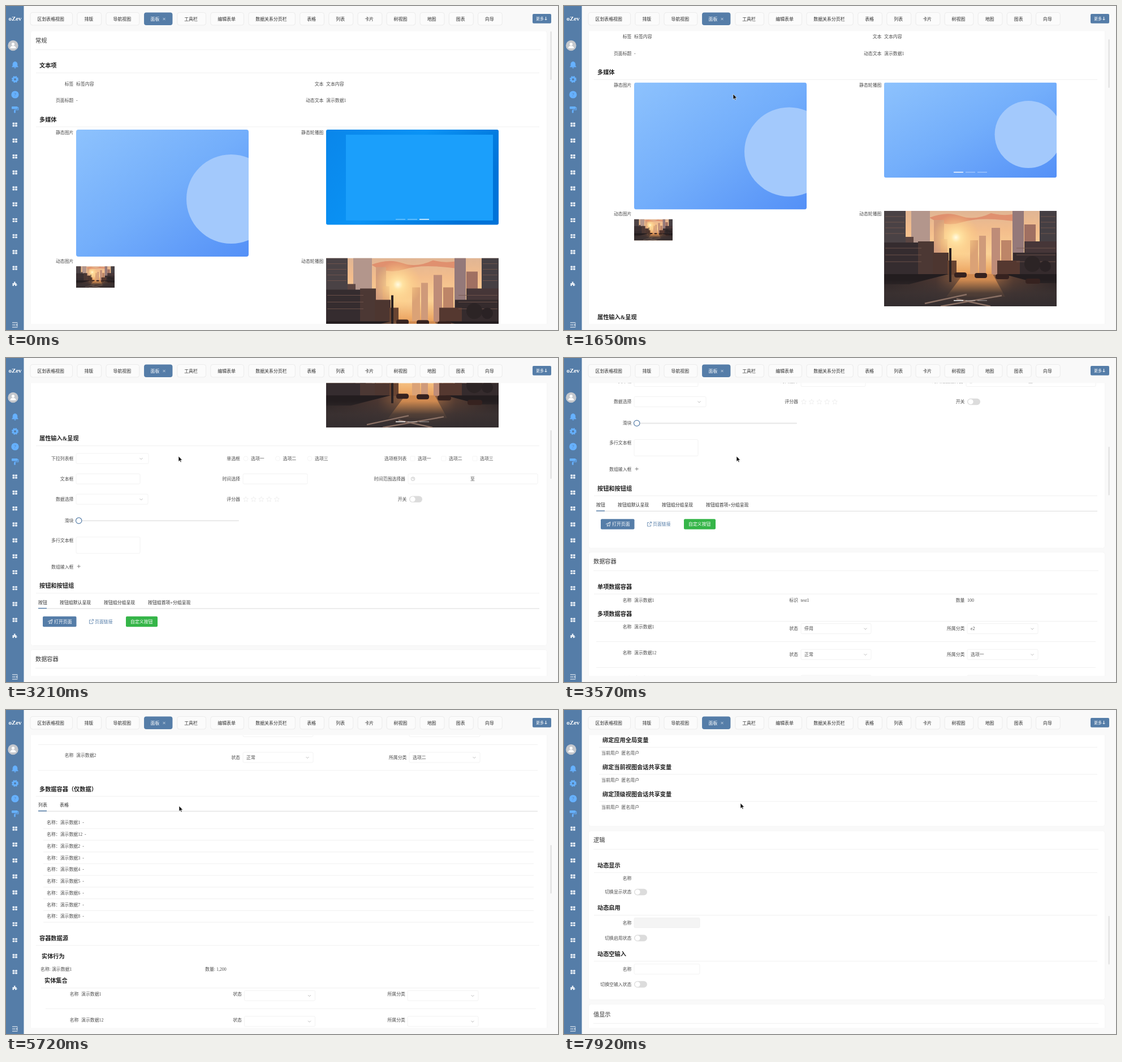
An HTML page that plays this animation: 976 px wide and 574 px high, repeating every 8 s.

```html
<!DOCTYPE html>
<html lang="zh-CN">
<head>
<meta charset="utf-8">
<title>面板</title>
<style>
html, body { margin: 0; width: 100%; height: 100%; overflow: hidden; background: #f9f9f9; }
svg { display: block; width: 976px; height: 574px; }
text { font-family: 'Liberation Serif', 'Noto Sans CJK SC', 'Noto Sans CJK', serif; white-space: pre; }
</style>
</head>
<body>
<svg id="stage" viewBox="0 0 976 574"></svg>
<script>
const BLUE = '#557da8', ICON = '#66b1ff', PALE = '#e6edf5';
const LOOP = 8000;

// ---- drawing helpers: y is the vertical centre of text and controls ----
const rect = (x, y, w, h, fill, r = 0, extra = '') =>
  `<rect x="${x}" y="${y}" width="${w}" height="${h}" rx="${r}" fill="${fill}" ${extra}/>`;
const circle = (x, y, r, fill, extra = '') => `<circle cx="${x}" cy="${y}" r="${r}" fill="${fill}" ${extra}/>`;
const path = (d, stroke, width = 1, fill = 'none') =>
  `<path d="${d}" stroke="${stroke}" stroke-width="${width}" fill="${fill}"/>`;
const shape = (d, fill) => path(d, 'none', 0, fill);
const text = (x, y, str, { size = 7.9, fill = '#4c4c4c', anchor = 'start', bold = false } = {}) =>
  `<text x="${x}" y="${y}" dy=".37em" font-size="${size}" fill="${fill}" text-anchor="${anchor}" font-weight="${bold ? 700 : 400}">${str}</text>`;
const label = (right, y, str) => text(right, y, str, { anchor: 'end' });
const field = (right, y, name, value, gap = 4.5) => label(right, y, name) + text(right + gap, y, value);
const rule = (y, x1 = 52, x2 = 945) => path(`M${x1} ${y}H${x2}`, '#ededed', .8);
const title = (y, str) => text(52, y, str, { size: 10.2, fill: '#333' }) + rule(y + 16.3);
const heading = (y, str, x) => text(x, y, str, { size: 10.2, fill: '#222', bold: true });
const section = (y, str, x = 59) => heading(y, str, x) + rule(y + 13, x - 6, 943);
const input = (x, y, w, h = 18, fill = '#fff') => rect(x, y - h / 2, w, h, fill, 2, 'stroke="#efefef" stroke-width=".8"');
const select = (x, y, w, value = '', arrow = w - 10) =>
  input(x, y, w) + text(x + 6, y, value) + path(`M${x + arrow - 2.5} ${y - 1}l2.5 2.5 2.5-2.5`, '#aaa', .8);
const toggle = (x, y) => rect(x, y - 5.7, 23, 11.4, '#dcdcdc', 5.7) + circle(x + 6, y, 4.6, '#fff');
const tabs = (y, items, x2) => items.map(([x, s]) => text(x, y, s, { fill: '#2c2c2c' })).join('') +
  path(`M57 ${y + 10.8}H${x2}`, '#e2e2e2', 1.2) + path(`M57 ${y + 10.3}h15`, BLUE, 1.4);
const dots = (y, id) => [0, 1, 2].map(i =>
  rect(689 + 21 * i, y, 17, 1.4, '#fff', 0, `${id ? `id="${id}${i}"` : ''} opacity="${i ? .4 : 1}"`)).join('');

const defs = `<defs>
  <linearGradient id="blue" x2="1" y2="1"><stop stop-color="#8dc2fd"/><stop offset=".5" stop-color="#73aefb"/><stop offset="1" stop-color="#5490f7"/></linearGradient>
  <linearGradient id="azure" x2="1" y2=".4"><stop stop-color="#0a86ea"/><stop offset=".5" stop-color="#0a93f5"/><stop offset="1" stop-color="#0073d8"/></linearGradient>
  <linearGradient id="sky" x2="0" y2="1"><stop stop-color="#e0b594"/><stop offset=".2" stop-color="#f3bd8c"/><stop offset=".45" stop-color="#fbd296"/><stop offset=".7" stop-color="#e89a55"/></linearGradient>
  <linearGradient id="road"><stop stop-color="#2d2526"/><stop offset=".3" stop-color="#4a3631"/><stop offset=".55" stop-color="#b67848"/><stop offset=".75" stop-color="#553c32"/><stop offset="1" stop-color="#2e2526"/></linearGradient>
  <linearGradient id="shade" x2="0" y2="1"><stop stop-color="#3b3232" stop-opacity="0"/><stop offset=".5" stop-color="#3b3232" stop-opacity=".85"/><stop offset="1" stop-color="#332d2f"/></linearGradient>
  <radialGradient id="sun"><stop stop-color="#fffbe2"/><stop offset=".2" stop-color="#ffe3a2"/><stop offset="1" stop-color="#ffc878" stop-opacity="0"/></radialGradient>
  <clipPath id="view"><rect x="43" y="44.5" width="914" height="518.5"/></clipPath>
  <clipPath id="still"><rect x="124" y="219" width="305" height="225" rx="4"/></clipPath>
  <clipPath id="slides"><rect x="566" y="219" width="305" height="168.5" rx="3"/></clipPath>
  <symbol id="city" viewBox="0 0 305 169">${city()}</symbol></defs>`;

function city() {
  const far = [[48, 0, 33, '#b3968c'], [88, 16, 18, '#d29c7c'], [100, 50, 12, '#dba075'], [152, 52, 14, '#dba276'],
    [168, 44, 12, '#cf9a7a'], [190, 30, 15, '#be8c78'], [207, 52, 18, '#bd8568'], [227, 0, 20, '#94797a'], [248, 24, 20, '#a07062']];
  const near = [[0, 0, 38, '#4a4245'], [38, 46, 14, '#5c4642'], [0, 56, 70, '#352c2f'], [60, 54, 28, '#4c3834'], [86, 74, 28, '#4d3630'],
    [112, 88, 16, '#684431'], [275, 0, 30, '#453f43'], [248, 54, 57, '#463638'], [228, 74, 77, '#352b2d'], [200, 88, 40, '#553830']];
  const block = ([x, y, w, c]) => rect(x, y, w, 116 - y, c);
  const floors = [10, 20, 30, 40, 66, 78, 90].map(y =>
    path(`M2 ${y}H${y < 50 ? 36 : 66}M${y < 50 ? 277 : 234} ${y}H303`, '#76594f', .8)).join('');
  const cars = [[124, 109, 22], [160, 110, 22], [197, 112, 24], [250, 120, 26]].map(([x, y, w]) => rect(x, y, w, 9, '#36221f', 4)).join('');
  return rect(0, 0, 305, 169, 'url(#sky)') +
    shape('M80 12q30-12 55-3t54-5q20 5 39 2v12q-60-8-90 2t-58-8z', '#e0906f') +
    far.map(block).join('') + circle(127, 47, 42, 'url(#sun)') + near.map(block).join('') + floors +
    rect(0, 113, 305, 56, 'url(#road)') + shape('M140 112h52l22 40H110z', '#d08a50') +
    shape('M0 112h114l-70 18H0zM305 112h-94l60 16h34z', '#231d1f') +
    rect(0, 122, 305, 47, 'url(#shade)') +
    path('M72 164L146 148M100 169L208 150M128 156L188 169', '#8a7064', 2.5) + cars +
    rect(115, 66, 4, 60, '#2a2122') + circle(262, 94, 14, '#2c2425') + circle(285, 98, 10, '#2a2224');
}

function chrome() {
  const grid = y => [0, 1, 2, 3].map(i => rect(11.5 + 4.6 * (i % 2), y - 3.6 + 4 * (i >> 1), 3.8, 3.2, PALE, .8)).join('');
  const sidebar = rect(0, 0, 31.5, 574, BLUE) +
    text(16, 22, 'oZev', { size: 11, fill: '#fff', anchor: 'middle', bold: true }) +
    circle(12.5, 70, 9.2, '#c5c8cd') + circle(12.5, 67.5, 2.6, '#fff') + shape('M7.5 75q0-4.5 5-4.5t5 4.5z', '#fff') +
    path('M10.5 108h11l-1.5-2v-3.5q-.5-3.5-4-4-3.5.5-4 4v3.5zM14.5 109h3l-1.5 1.5z', ICON, .6, ICON) +
    circle(16, 130, 4.8, ICON, `stroke="${ICON}" stroke-width="2.4" stroke-dasharray="2.3 1.47"`) + circle(16, 130, 2, BLUE) +
    circle(16, 157, 6.6, ICON) + text(16, 157, '?', { fill: BLUE, anchor: 'middle', size: 8 }) +
    rect(10, 178, 10.5, 4.5, ICON, 1) + path('M20 180h1.8v4h-6.3v1', ICON, 1.1) + rect(14.2, 184.5, 2.6, 5, ICON, .8) +
    Array.from({ length: 10 }, (_, i) => grid(210.2 + 28.22 * i)).join('') +
    shape('M11.5 496v-5h2.5v-2.5h2.5v2.5h2v2.5h1.5v1h-1.5v1.5h-2.5v-2h-2v2z', PALE) +
    path('M11 561h9.5M11 565h6M11 569h9.5M20.5 563l-2 2 2 2', '#fff', 1.1);

  let x = 43;
  const names = '区划表格视图 排版 导航视图 面板 工具栏 编辑表单 数据关系分页栏 表格 列表 卡片 树视图 地图 图表 向导'.split(' ');
  const nav = names.map(name => {
    const active = name === '面板', width = name.length * 7.93 + (active ? 34.5 : 27);
    const box = rect(x, 11.5, width, 22.5, active ? BLUE : '#fbfbfb', 4, active ? '' : 'stroke="#e8e8e8" stroke-width=".8"') +
      text(x + (active ? 11.5 : 12.5), 22.8, name, { fill: active ? '#fff' : '#2c2c2c' }) +
      (active ? path(`M${x + 33.5} 21l4 4m0-4l-4 4`, '#dbe5ef', .8) : '');
    x += width + 8.3;
    return box;
  }).join('');
  const more = rect(931, 14, 33, 16.8, BLUE, 2) + text(937, 22, '更多', { size: 7, fill: '#fff' }) +
    path('M954.5 19v6m-2-2l2 2 2-2', '#fff', .9);
  return sidebar + nav + more;
}

function general() {
  const outline = 'stroke="#efefef" stroke-width=".7"';
  const options = (x, step, mark) => ['选项一', '选项二', '选项三'].map((s, i) =>
    mark(x + i * step) + text(x + i * step + 9, 670.5, s)).join('');
  const radio = x => circle(x, 670.5, 4, '#fff', outline);
  const check = x => rect(x - 4, 666.5, 8, 8, '#fff', 1, outline);
  const star = x => path(`M${x} 738l1.3 3 3.2.3-2.4 2.2.7 3.2-2.8-1.6-2.8 1.6.7-3.2-2.4-2.2 3.2-.3z`, '#e9e9e9', .7);
  const emblem = (x, y, r) => circle(x, y, r, '#a3c9fc');
  const media = `<g clip-path="url(#still)">${rect(124, 219, 305, 225, 'url(#blue)')}${emblem(398, 342, 79)}</g>
    <g clip-path="url(#slides)">
      <g id="slideOut">${rect(566, 219, 305, 169, 'url(#azure)')}${rect(601, 228, 260, 152, '#1b9ffb')}</g>
      <g id="slideIn">${rect(566, 219, 305, 169, 'url(#blue)')}${emblem(821, 311, 59.5)}</g>
    </g>` + dots(377.3, 'dot') +
    '<use href="#city" x="124" y="461" width="68" height="38"/><use href="#city" x="566" y="446.5" width="305" height="169"/>' + dots(604.6);
  return title(61, '常规') + section(105.5, '文本项') +
    field(119.5, 138, '标签', '标签内容') + field(561.5, 138, '文本', '文本内容') +
    field(119.5, 167.5, '页面标题', '-') + field(561.5, 167.5, '动态文本', '演示数据1') +
    section(201, '多媒体') + label(119.5, 224, '静态图片') + label(561.5, 224, '静态轮播图') +
    label(119.5, 452, '动态图片') + label(561.5, 452, '动态轮播图') + media +
    section(635, '属性输入&amp;呈现') +
    label(119.5, 670.5, '下拉列表框') + select(124, 670.5, 128, '', 115) +
    label(414, 670.5, '单选框') + options(424, 56.5, radio) + label(708.5, 670.5, '选项框列表') + options(719, 55, check) +
    label(119.5, 706.5, '文本框') + input(124, 706.5, 113) + label(414, 706.5, '时间选择') + input(419, 706.5, 114) +
    label(706, 706.5, '时间范围选择器') + input(711, 706.5, 229) +
    circle(719.5, 706.5, 3.2, 'none', 'stroke="#aaa" stroke-width=".7"') + path('M719.5 704.5v2h1.5', '#aaa', .7) + text(821, 706.5, '至') +
    label(119.5, 742.5, '数据选择') + select(124, 742.5, 127, '', 115) +
    label(414, 742.5, '评分器') + [0, 1, 2, 3, 4].map(i => star(424 + 13.7 * i)).join('') +
    label(708.5, 742.5, '开关') + toggle(713, 742.5) +
    label(119.5, 780.5, '滑块') + rect(124, 779.5, 288, 2.2, '#e9e9e9', 1) + circle(128.7, 780.5, 5.2, '#fff', `stroke="${BLUE}" stroke-width="1.2"`) +
    label(119.5, 815, '多行文本框') + input(124, 824, 113, 29) +
    label(119.5, 862, '数组输入框') + path('M125.7 861.5h6m-3-3v6', '#777', .9) +
    section(896, '按钮和按钮组') +
    tabs(925.5, [[57, '按钮'], [95, '按钮组默认呈现'], [173, '按钮组分组呈现'], [251, '按钮组首项+分组呈现']], 943) +
    rect(65, 950.2, 59.5, 18.3, BLUE, 2) + path('M74 959.5l8-4-1.5 7.5-2.5-1.5-1.5 1.8v-2.8l4-3.5', '#fff', .8) +
    text(85, 959.5, '打开页面', { fill: '#fff' }) +
    path('M150.5 956.5h-3v6.5h6v-3M150 960l4.5-4.5m-2.8 0h2.8v2.8', BLUE, .8) + text(157, 959.5, '页面链接', { fill: BLUE }) +
    rect(212, 950.2, 56, 18.3, '#35b548', 2) + text(220, 959.5, '自定义按钮', { fill: '#fff' });
}

function containers() {
  const rows = [['演示数据1', '停用', 'e2'], ['演示数据12', '正常', '选项一'], ['演示数据2', '正常', '选项二']];
  const editable = rows.map(([name, state, kind], i) => {
    const y = 1141 + 45.75 * i;
    return field(119.5, y, '名称', name) + label(414, y + 3.5, '状态') + select(419, y + 3.5, 124, state) +
      label(708.5, y + 3.5, '所属分类') + select(713, y + 3.5, 125, kind) + rule(y + 26.5, 57, 940);
  }).join('');
  const list = [1, 12, 2, 3, 4, 5, 6, 7, 8].map((n, i) => {
    const y = 1351.5 + 20.75 * i;
    return text(72, y, `名称：演示数据${n} \u00a0-`) + rule(y + 10.5, 66, 933);
  }).join('');
  const entities = rows.map(([name], i) => {
    const y = 1655 + 45.6 * i;
    return field(128.5, y, '名称', name) + label(417, y, '状态') + select(421.5, y + 3, 125, '', 115) +
      label(706, y, '所属分类') + select(710, y + 3, 125, '', 115) + rule(y + 26, 70, 937);
  }).join('');
  const user = y => text(66, y, '当前用户') + text(101.5, y, '匿名用户');
  return title(1025.5, '数据容器') + section(1070, '单项数据容器') +
    field(119.5, 1094, '名称', '演示数据1') + field(414, 1094, '标识', 'test1') + field(708.5, 1094, '数量', '100') +
    section(1118.5, '多项数据容器') + editable +
    section(1292, '多数据容器（仅数据）') + tabs(1320.5, [[57, '列表'], [95, '表格']], 940) + list +
    section(1556, '容器数据源') + heading(1588, '实体行为', 63) +
    text(61, 1611.5, '名称: 演示数据1') + text(352, 1611.5, '数量: 1,200') +
    section(1631.5, '实体集合', 68) + entities +
    section(1805.5, '实体逻辑', 68) + text(66, 1828.5, '名称：演示数据1') + text(134, 1828.5, '数量: 1,000') +
    section(1853, '自定义脚本', 68) + text(66, 1877, '名称：演示数据1') + text(134, 1877, '数量：12,000') +
    section(1901, '绑定当前数据变量', 68) + text(66, 1924.5, '名称：演示数据1') +
    section(1949, '绑定应用全局变量', 68) + user(1972.5) +
    section(1997, '绑定当前视图会话共享变量', 68) + user(2020.5) +
    section(2045, '绑定顶级视图会话共享变量', 68) + user(2068.5);
}

function logic() {
  const switchRow = (y, name) => label(119.5, y, name) + toggle(124, y);
  return title(2126.5, '逻辑') +
    section(2171, '动态显示') + label(119.5, 2194.5, '名称') + switchRow(2218.5, '切换显示状态') +
    section(2246.5, '动态启用') + label(119.5, 2273, '名称') + input(124, 2273, 116, 17.5, '#f4f4f4') + switchRow(2300, '切换启用状态') +
    section(2328, '动态空输入') + label(119.5, 2355, '名称') + input(124, 2355, 116) + switchRow(2382, '切换空输入状态') +
    title(2435, '值显示');
}

const cards = [[44, 1002], [1009, 2102], [2110, 2409.5], [2417, 2600]]
  .map(([top, bottom]) => rect(43.5, top, 913, bottom - top, '#fff', 4, 'stroke="#f3f3f3" stroke-width=".8"')).join('');

document.getElementById('stage').innerHTML = defs + rect(0, 0, 976, 574, '#f9f9f9') +
  `<g clip-path="url(#view)"><g id="page">${cards}${general()}${containers()}${logic()}</g></g>` + chrome() +
  rect(962.5, 45, 2.2, 86, '#e0e0e0', 1, 'id="thumb"') +
  '<path id="cursor" d="M0 0v9.5l2.2-2 1.5 3.3 1.5-.7-1.5-3.2h3z" fill="#111" stroke="#fff" stroke-width=".6"/>';

// ---- motion: [time, value] keys, linear in between ----
const scrollKeys = [[0, 0], [1350, 0], [1640, 83.5], [1745, 83.5], [1830, 115], [2240, 115], [2520, 294.5], [2615, 294.5],
  [2720, 370], [3050, 370], [3300, 560], [3560, 665], [4120, 665], [4340, 870], [4620, 870], [5000, 1080], [5300, 1135],
  [5690, 1135], [5718, 1152], [5740, 1152], [5900, 1300], [6070, 1380], [6420, 1380], [6600, 1540], [6755, 1625],
  [7510, 1625], [7700, 1790], [7915, 1896], [LOOP, 1896]];
const cursorX = [[300, 290], [870, 299], [1830, 299], [2050, 305], [4650, 305], [5310, 306], [6070, 306], [6450, 309], [7120, 309], [7550, 312], [LOOP, 312]];
const cursorY = [[300, 40], [870, 156], [1830, 156], [2050, 174], [4650, 174], [5310, 170], [7120, 170], [7550, 165], [LOOP, 165]];

function at(keys, t) {
  const i = keys.findIndex(k => k[0] > t);
  if (i <= 0) return keys[i < 0 ? keys.length - 1 : 0][1];
  const [t0, a] = keys[i - 1], [t1, b] = keys[i];
  return a + (b - a) * (t - t0) / (t1 - t0);
}

const $ = id => document.getElementById(id);
const move = (id, x, y) => $(id).setAttribute('transform', `translate(${x} ${y})`);

function draw() {
  const t = performance.now() % LOOP;
  const scroll = at(scrollKeys, t);
  move('page', 0, -scroll);
  move('thumb', 0, scroll * .1687);
  const p = Math.min(1, Math.max(0, (t - 140) / 400)), slide = p * p * (3 - 2 * p);
  move('slideOut', -305 * slide, 0);
  move('slideIn', 305 * (1 - slide), 0);
  [0, 1, 2].forEach(i => $('dot' + i).setAttribute('opacity', i === (t < 140 ? 2 : 0) ? 1 : .4));
  move('cursor', at(cursorX, t), at(cursorY, t));
  $('cursor').setAttribute('opacity', t < 300 ? 0 : 1);
  requestAnimationFrame(draw);
}
draw();
</script>
</body>
</html>
```
